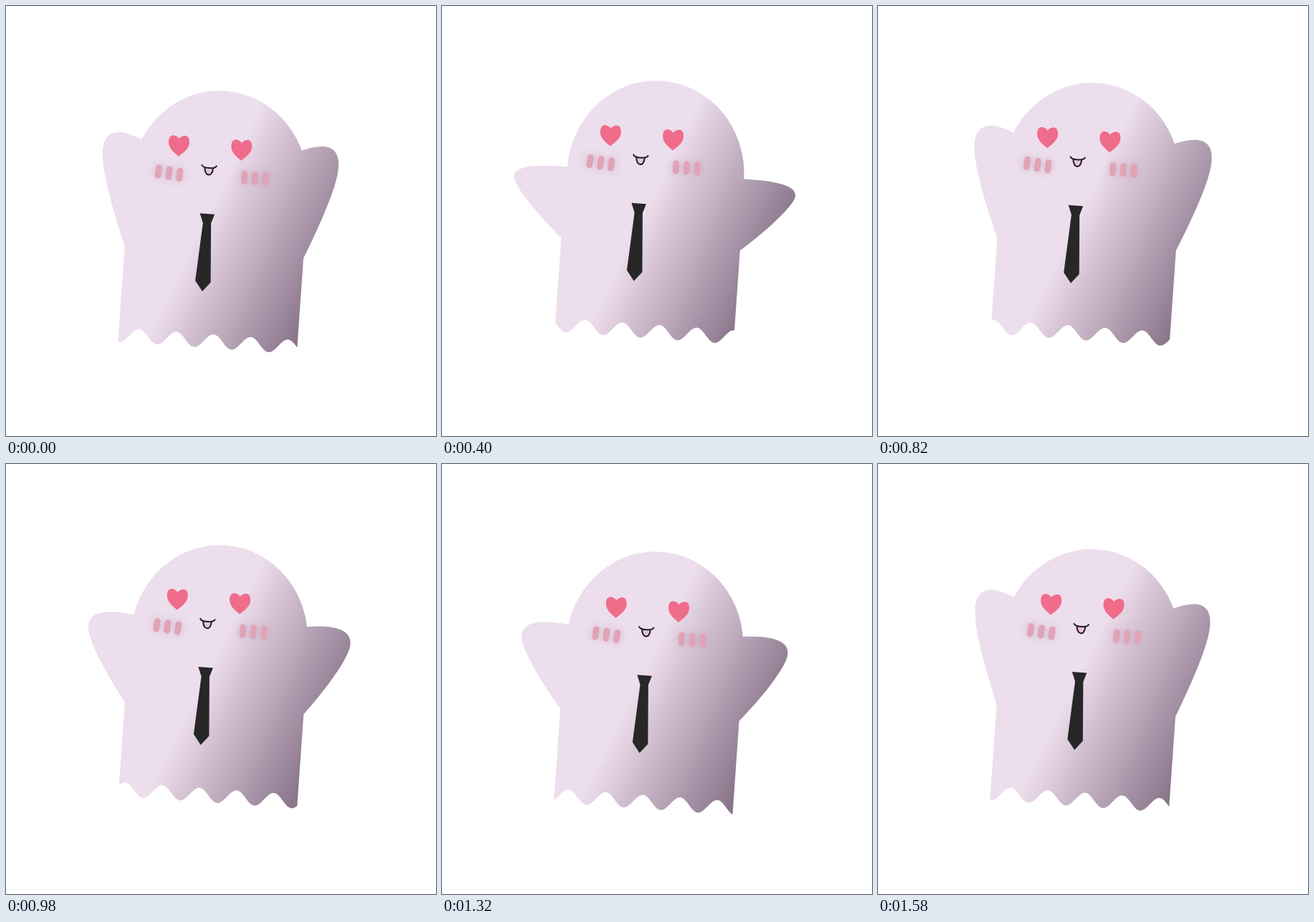
Write an HTML page with a canvas that moves like this. It is 600 by 600 pixels and loops after 1.6 s.

```html
<!DOCTYPE html>
<html lang="en">
<head>
<meta charset="utf-8">
<title>Happy ghost</title>
<style>
  html, body { margin: 0; width: 100%; height: 100%; overflow: hidden; background: #fff; }
  canvas { display: block; width: 600px; height: 600px; }
</style>
</head>
<body>
<canvas id="stage" width="600" height="600"></canvas>
<script>
const ctx = document.getElementById('stage').getContext('2d');
const LOOP = 1600;
const TAU = Math.PI * 2;
const TILT = 4 * Math.PI / 180;

// Left arm outline, raised and lowered: start, two cubic curves, inner end
const ARM_UP = [-100, -49, -142, -71, -165.5, -67, -164.8, -34.2, -164.5, -4, -141, 56, -121, 105, -85, 95];
const ARM_DOWN = [-100, -1, -160, -3.5, -197, 0, -196.8, 17.1, -196.5, 29, -158, 71, -120, 102, -85, 95];

const shade = ctx.createLinearGradient(341, 170, 510, 253);
shade.addColorStop(0, '#ecdeec');
shade.addColorStop(0.05, '#e8d7e6');
shade.addColorStop(1, '#8a758b');

const heart = new Path2D('M0-9.5C2-14 14.5-19 14.5-5C14.5 4 6 10 0 14.8C-6 10-14.5 4-14.5-5C-14.5-19-2-14 0-9.5Z');
const tie = new Path2D('M270.5 289.5L291 291L286 303.5L285.5 386L273.8 398.5L264 383.5L274.7 303Z');
const smile = new Path2D('M273.3 222.3C275 227 291 228 293.6 223.7');
const tongue = new Path2D('M277.3 225.8C277 239 288.5 239 288.8 226.5');

function body(wave) {
  ctx.beginPath();
  ctx.ellipse(0, 0, 123.5, 130.5, 0, Math.PI, TAU);
  ctx.lineTo(125, 50);
  for (let x = 125; x >= -125; x--) {
    ctx.lineTo(x, 219.3 - 9.7 * Math.cos(TAU * (x - wave) / 52));
  }
  ctx.lineTo(-125, 50);
  ctx.closePath();
}

function arm(lift) {
  const p = ARM_UP.map((v, i) => ARM_DOWN[i] + (v - ARM_DOWN[i]) * lift);
  ctx.beginPath();
  ctx.moveTo(p[0], p[1]);
  ctx.bezierCurveTo(...p.slice(2, 8));
  ctx.bezierCurveTo(...p.slice(8, 14));
  ctx.lineTo(p[14], p[15]);
  ctx.closePath();
}

// The outline is tilted, the shading stays fixed to the stage
function fillTilted(x, y, outline, flip = 1) {
  ctx.save();
  ctx.translate(x, y);
  ctx.rotate(TILT);
  ctx.scale(flip, 1);
  outline();
  ctx.restore();
  ctx.fillStyle = shade;
  ctx.fill();
}

function at(x, y, degrees, paint) {
  ctx.save();
  ctx.translate(x, y);
  ctx.rotate(degrees * Math.PI / 180);
  paint();
  ctx.restore();
}

function cheek(x, y, stepY, degrees) {
  ctx.save();
  ctx.fillStyle = '#e0a4b6';
  ctx.shadowColor = 'rgba(190, 150, 180, 0.55)';
  ctx.shadowBlur = 12;
  for (let i = -1; i <= 1; i++) {
    at(x + i * 14.8, y + i * stepY, degrees, () => {
      ctx.beginPath();
      ctx.roundRect(-4.4, -9.7, 8.8, 19.4, 4.4);
      ctx.fill();
    });
  }
  ctx.restore();
}

function face(dx, dy) {
  ctx.save();
  ctx.translate(dx, dy);

  cheek(227.4, 233.4, 2.2, 8);
  cheek(347.3, 240.7, 1, 3);

  ctx.fillStyle = '#ef6c8b';
  at(241.2, 195.3, 2, () => ctx.fill(heart));
  at(328.5, 201.3, 2, () => ctx.fill(heart));

  ctx.fillStyle = '#e6c3d3';
  ctx.fill(tongue);
  ctx.strokeStyle = '#1f1a26';
  ctx.lineWidth = 2;
  ctx.lineCap = 'round';
  ctx.stroke(tongue);
  ctx.stroke(smile);

  ctx.fillStyle = '#272727';
  ctx.fill(tie);
  ctx.restore();
}

function draw(t) {
  const phase = TAU * (t - 560) / LOOP;
  const bob = -Math.cos(phase);
  const x = 297.4 - 0.7 * bob;
  const y = 242.8 + 10 * bob;
  const lift = 0.5 + 0.523 * Math.cos(TAU * (t + 38) / 800);

  ctx.fillStyle = '#fff';
  ctx.fillRect(0, 0, 600, 600);
  fillTilted(x, y, () => arm(lift));
  fillTilted(x, y, () => arm(lift), -1);
  fillTilted(x, y, () => body(-96.6 + 52 * t / LOOP));
  face(
    4.4 * bob - 2.5,
    10.35 * bob + Math.cos(2 * phase) + 0.3 * Math.sin(2 * phase) - 6.3
  );
}

function tick() {
  draw(performance.now() % LOOP);
  requestAnimationFrame(tick);
}
tick();
</script>
</body>
</html>
```
